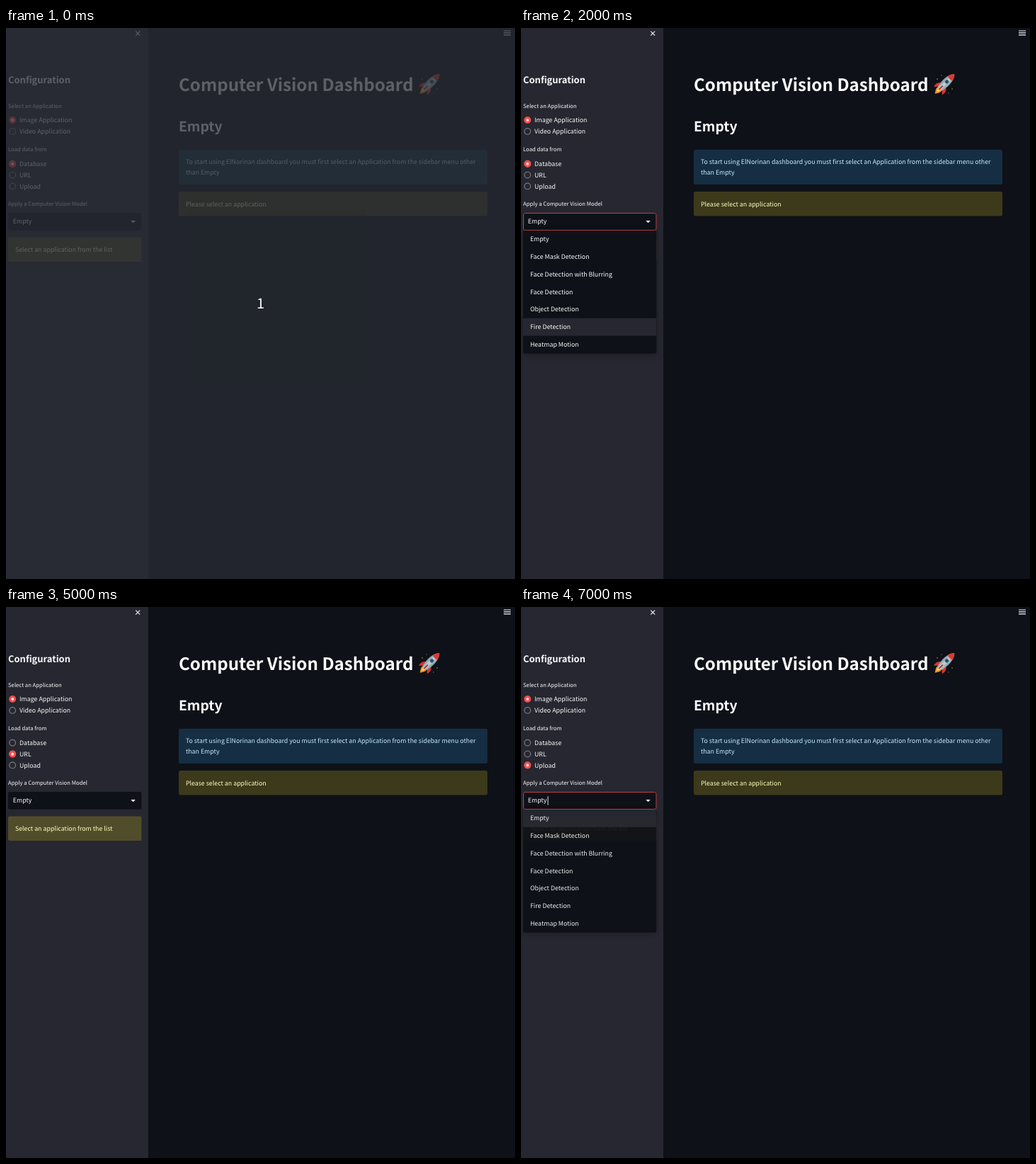
Recreate the animation shown at these times as an HTML page. Size 719 by 778 pixels, loop 8000 ms.

```html
<!DOCTYPE html>
<html lang="en">
<head>
<meta charset="utf-8">
<title>Computer Vision Dashboard</title>
<style>
  html, body { margin: 0; width: 100%; height: 100%; overflow: hidden; background: #0e1117; }
  svg { display: block; width: 719px; height: 778px; }
  text {
    font: 8.83px "Noto Sans CJK JP", "Noto Sans CJK SC", "Noto Sans CJK", "Noto Sans", sans-serif;
    fill: #fafafa;
    text-rendering: geometricPrecision;
  }
  .h1 { font-size: 24.13px; font-weight: 700; }
  .h2 { font-size: 19.3px; font-weight: 600; }
  .h3 { font-size: 12.95px; font-weight: 600; }
  .label { font-size: 7.73px; }
  .count { font-size: 20px; fill: #fff; }
  .info { fill: #c7ebff; }
  .warn { fill: #ffffc2; }
  .ring { fill: #262730; stroke: #7c7d84; stroke-width: 1.2; }

  /* every state change is a hard cut on a whole second of the 8 s loop */
  .cut { opacity: 0; animation: 8s step-end infinite; }
  .overlay { animation-name: overlay; }
  .focus { animation-name: focus; }
  .caret { animation-name: caret; }
  .list { animation-name: list; }
  .running, .database { animation-name: fifth; }
  .video { animation-name: fourth; }
  .url { animation-name: seventh; }
  .hover { animation: hover 8s step-end infinite; }
  .source { animation: source 8s step-end infinite; }

  @keyframes overlay { 0% { opacity: 1 } 12.5% { opacity: 0 } }
  @keyframes focus { 12.5% { opacity: 1 } 50% { opacity: 0 } 87.5%, 100% { opacity: 1 } }
  @keyframes caret { 12.5% { opacity: 1 } 25% { opacity: 0 } 87.5%, 100% { opacity: 1 } }
  @keyframes list { 12.5% { opacity: 1 } 50% { opacity: 0 } 87.5%, 100% { opacity: .94 } }
  @keyframes fourth { 37.5% { opacity: 1 } 50% { opacity: 0 } }
  @keyframes fifth { 50% { opacity: 1 } 62.5% { opacity: 0 } }
  @keyframes seventh { 75% { opacity: 1 } 87.5% { opacity: 0 } }
  @keyframes hover { 25% { transform: translateY(123.75px) } 37.5% { transform: none } }
  @keyframes source {
    50% { transform: translateY(15.8px) }
    75%, 100% { transform: translateY(31.6px) }
  }
</style>
</head>
<body>
<svg viewBox="0 0 719 778">
  <defs>
    <circle id="ring" class="ring" r="4.35"/>
    <circle id="fill" r="3.8"/>
    <g id="picked"><circle r="4.95" fill="#ff4b4b"/><circle r="1.85" fill="#fff"/></g>
    <linearGradient id="hull"><stop offset="0" stop-color="#7d97a3"/><stop offset=".5" stop-color="#c5d3d9"/><stop offset="1" stop-color="#8199a5"/></linearGradient>
  </defs>

  <rect width="719" height="778" fill="#0e1117"/>
  <rect width="201" height="778" fill="#262730"/>

  <!-- sidebar -->
  <path d="M183.2 4.6l6 6m0-6l-6 6" stroke="#fafafa" stroke-width="1.1"/>
  <text class="h3" x="3" y="78">Configuration</text>

  <text class="label" x="3" y="113">Select an Application</text>
  <use href="#picked" x="9.2" y="130"/>
  <use href="#ring" x="9.2" y="145.9"/>
  <use href="#fill" class="cut video" x="9.2" y="145.9" fill="#0e1117"/>
  <text x="19" y="133.3">Image Application</text>
  <text x="19" y="149.1">Video Application</text>

  <text class="label" x="3" y="174.2">Load data from</text>
  <use href="#ring" x="9.2" y="191.8"/>
  <use href="#ring" x="9.2" y="207.6"/>
  <use href="#ring" x="9.2" y="223.4"/>
  <use href="#fill" class="cut database" x="9.2" y="191.8" fill="#505158"/>
  <use href="#fill" class="cut url" x="9.2" y="207.6" fill="#0e1117"/>
  <g class="source"><use href="#picked" x="9.2" y="191.8"/></g>
  <text x="19" y="195.3">Database</text>
  <text x="19" y="211.1">URL</text>
  <text x="19" y="226.9">Upload</text>

  <text class="label" x="3" y="251.2">Apply a Computer Vision Model</text>
  <rect x="3" y="261" width="188.4" height="24.7" rx="2.5" fill="#0e1117"/>
  <rect class="cut focus" x="3.5" y="261.5" width="187.5" height="24" rx="2.3" fill="none" stroke="#c24145"/>
  <text x="9.8" y="276.4">Empty</text>
  <rect class="cut caret" x="37.6" y="267.3" width=".9" height="12.4" fill="#fafafa"/>
  <path d="M176.4 271.9h6.4l-3.2 3.3z" fill="#fafafa"/>

  <rect x="3" y="295.6" width="188.4" height="34.5" rx="2.5" fill="#514d2a"/>
  <text class="warn" x="12.9" y="316.4">Select an application from the list</text>

  <g class="cut list">
    <rect x="3" y="286" width="188.4" height="173.6" rx="2.5" fill="#0e1117" style="filter: drop-shadow(0 2px 4px #0004)"/>
    <rect class="hover" x="3" y="286" width="188.4" height="24.8" fill="#262730"/>
    <g id="options"></g>
  </g>

  <!-- main column -->
  <path d="M703 4h10m-10 2.9h10m-10 2.9h10" stroke="#fafafa" stroke-width="1.2"/>
  <g class="cut running">
    <g fill="#34373d">
      <circle cx="602" cy="2" r="1.3"/>
      <path d="M597 3.6h10v1.3h-3.3v8.4h-1.2V9.5h-1v3.8h-1.2V4.9H597z"/>
    </g>
    <text class="label" x="615" y="10" style="fill: #34373d">RUNNING...</text>
    <text class="label" x="669" y="10" style="fill: #52555a">Stop</text>
  </g>

  <text class="h1" x="244" y="88.8">Computer Vision Dashboard</text>

  <g transform="translate(598 79.4) rotate(45)">
    <path d="M-3.4 9C-5 13 -2 15 0 19C2 15 5 13 3.4 9z" fill="#f79329"/>
    <path d="M-1.7 9C-2.4 12 -1 13 0 15C1 13 2.4 12 1.7 9z" fill="#ffe36c"/>
    <path d="M-4 1C-9 4 -9.5 8 -8.4 13L-3.4 8zM4 1C9 4 9.5 8 8.4 13L3.4 8z" fill="#d7352f"/>
    <path d="M0 -20C-7 -13 -6.6 0 -3.8 9.6H3.8C6.6 0 7 -13 0 -20z" fill="url(#hull)"/>
    <path d="M0 -20.4C-2.7 -17.6 -4.2 -14.5 -4.8 -11.4Q0 -9.4 4.8 -11.4C4.2 -14.5 2.7 -17.6 0 -20.4z" fill="#d93c35"/>
    <circle cy="-5" r="2.7" fill="#455f6b"/>
    <circle cy="-5" r="1.7" fill="#234a60"/>
    <path d="M-.9 3h1.8v8h-1.8z" fill="#b32b2b"/>
  </g>
  <g fill="#e8b34b">
    <circle cx="588" cy="72" r=".7"/><circle cx="594" cy="67" r=".6"/>
    <circle cx="609" cy="86" r=".7"/><circle cx="604" cy="92" r=".6"/>
  </g>

  <text class="h2" x="244" y="146">Empty</text>

  <rect x="244" y="171.8" width="436" height="49.3" rx="2.5" fill="#152e43"/>
  <text class="info" x="253.9" y="192.4">To start using ElNorinan dashboard you must first select an Application from the sidebar menu other</text>
  <text class="info" x="253.9" y="207.2">than Empty</text>

  <rect x="244" y="231" width="436" height="34.6" rx="2.5" fill="#3d3a1b"/>
  <text class="warn" x="253.9" y="251.9">Please select an application</text>

  <!-- countdown veil -->
  <g class="cut overlay">
    <rect width="719" height="778" fill="#292c35" fill-opacity=".75"/>
    <text class="count" x="359.5" y="396.2" text-anchor="middle">1</text>
  </g>
</svg>
<script>
  const models = ["Empty", "Face Mask Detection", "Face Detection with Blurring",
    "Face Detection", "Object Detection", "Fire Detection", "Heatmap Motion"];
  document.getElementById("options").innerHTML = models
    .map((name, i) => `<text x="12.9" y="${301.45 + i * 24.75}">${name}</text>`)
    .join("");
</script>
</body>
</html>
```
